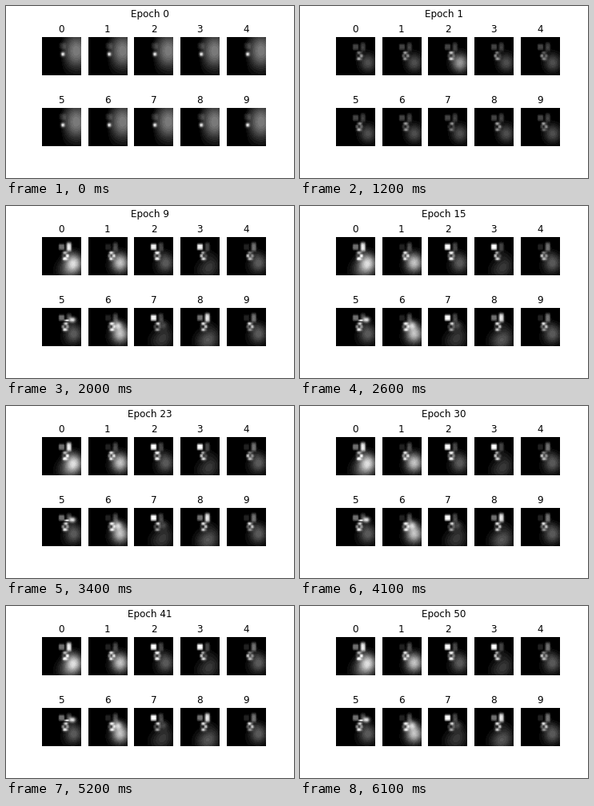
A matplotlib script for the animation above (7200 ms loop, 360x216 px).

```python
import numpy as np
import matplotlib.pyplot as plt
from matplotlib.animation import FuncAnimation

plt.rcParams["font.family"] = "DejaVu Sans"

SIZE, CELLS = 48, 28
LAST_EPOCH, HOLD_FRAMES, FRAMES, INTERVAL = 50, 11, 72, 100
SPOTS = 6

step = SIZE / CELLS
X, Y = np.meshgrid(*[(np.arange(CELLS) + 0.5) * step] * 2)
rng = np.random.default_rng(4)


def bump(x, y, rx, ry, power=2):
    """Smooth spot; a higher power makes it more like a box."""
    return np.exp(-np.abs((X - x) / rx) ** power - np.abs((Y - y) / ry) ** power)


def level(digit, bright, half, high, mid, low):
    """Strength of a feature, by the group its digit belongs to."""
    if str(digit) in bright:
        return high
    return mid if str(digit) in half else low


def untrained():
    haze = 0.5 * bump(42, 18, 15, 21) / (1 + np.exp((24 - X) / 1.5))
    return haze + bump(25.5, 22, 2.1, 2.3) + 0.16 * bump(25.5, 12, 4, 4, 4)


# Large features first, then a ring of small spots around the centre of gaze.
tile = bump(24, 13, 3.6, 3.6, 8)
pillar = bump(33, 13, 3.1, 5.5, 4)
ember = bump(37.5, 15.5, 3.6, 3) + bump(30.5, 16.5, 2.6, 1, 6)
mist = bump(36, 22, 5, 5)
glow = bump(39, 32.5, 10, 11)
low_glow = bump(32, 42, 13, 12)
ring = [bump(28.5 + 2.6 * np.cos(a), 24 + 4.4 * np.sin(a), 2, 1.8, 3)
        for a in np.arange(SPOTS) * 2 * np.pi / SPOTS]
KERNELS = np.array([tile, pillar, ember, mist, glow, low_glow, *ring])


def learned_weights(digit, spots):
    return np.array([
        level(digit, "237", "058", 1.0, 0.45, 0.15),
        level(digit, "08", "49", 0.9, 0.45, 0.28),
        level(digit, "5", "", 0.9, 0, 0),
        level(digit, "6", "7", 0.55, 0.25, 0.05),
        level(digit, "016", "2459", 0.75, 0.36, 0.12),
        level(digit, "08", "37", 0.3, 0.18, 0.04),
        *spots,
    ])


def first_weights(digit, spots):
    return np.array([0.28, 0.25, 0, 0, level(digit, "2", "", 0.6, 0, 0.32), 0,
                     *(0.7 * spots)])


START = untrained()
spot_weights = rng.uniform(0.15, 0.85, (10, SPOTS))
LEARNED = [learned_weights(d, s) for d, s in enumerate(spot_weights)]
FIRST = [first_weights(d, s) for d, s in enumerate(spot_weights)]
TAU = np.where(np.arange(len(KERNELS)) == 0, 3.0, 1.4)  # the tile learns slower


def field(digit, epoch):
    if epoch == 0:
        return START
    kept = np.exp(-(epoch - 1) / TAU)
    weights = LEARNED[digit] + (FIRST[digit] - LEARNED[digit]) * kept
    return np.tensordot(weights, KERNELS, 1)


fig, axes = plt.subplots(2, 5, figsize=(5, 3), dpi=72, facecolor="white")
fig.subplots_adjust(left=0.125, right=0.9, bottom=0.125, top=0.88,
                    wspace=0.2, hspace=0.2)
heading = fig.suptitle("Epoch 0", fontsize=12)
gray = plt.get_cmap("gray", 24)
images = []
for digit, ax in enumerate(axes.flat):
    ax.set_title(str(digit), fontsize=12)
    ax.axis("off")
    images.append(ax.imshow(START, cmap=gray, vmin=0, vmax=1,
                            interpolation="bilinear"))


def draw(frame):
    epoch = min(max(frame - HOLD_FRAMES, 0), LAST_EPOCH)
    heading.set_text(f"Epoch {epoch}")
    for digit, image in enumerate(images):
        image.set_data(np.clip(field(digit, epoch), 0, 1))
    return [heading, *images]


anim = FuncAnimation(fig, draw, frames=FRAMES, interval=INTERVAL,
                     repeat=True, repeat_delay=0, blit=False)
plt.show()
```
